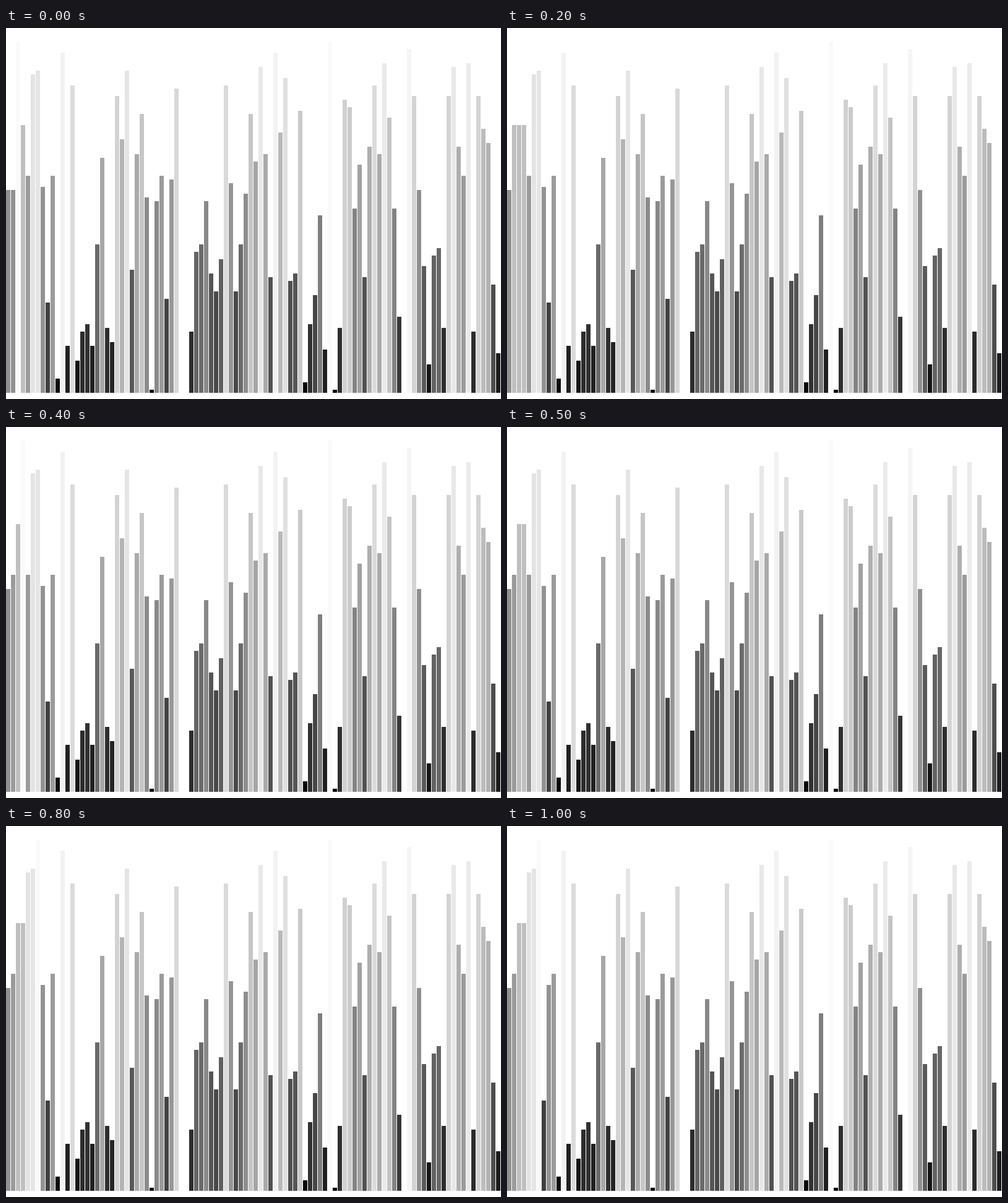
Animation, 800 px wide and 600 px high, one loop 1.1 s. Source, as an HTML page:

```html
<!DOCTYPE html>
<html lang="en">
<head>
<meta charset="utf-8">
<title>Merge sort</title>
<style>
  html, body { margin: 0; width: 100%; height: 100%; overflow: hidden; background: #fff; }
  svg { display: block; width: 100%; height: 100%; }
</style>
</head>
<body>
<svg id="stage" viewBox="0 0 800 600" shape-rendering="crispEdges"></svg>
<script>
const STEP_MS = 100, STEPS = 11;
const PITCH = 8, BAR_WIDTH = 7, FLOOR_Y = 590, MAX_HEIGHT = 580, MAX_VALUE = 99;

const values = [
  74, 56, 97, 74, 60, 88, 89, 57, 25, 60, 4, 94, 13, 85, 9, 17, 19, 13, 41, 65,
  18, 14, 82, 70, 89, 34, 66, 77, 54, 1, 53, 60, 26, 59, 84, 99, 99, 17, 39, 41,
  53, 33, 28, 37, 85, 58, 28, 41, 55, 77, 64, 90, 66, 32, 94, 72, 87, 31, 33, 78,
  3, 19, 27, 49, 12, 97, 1, 18, 81, 79, 51, 63, 32, 68, 85, 66, 91, 76, 51, 21,
  99, 95, 82, 56, 35, 8, 38, 40, 18, 82, 90, 68, 60, 91, 17, 82, 73, 69, 30, 11
];

// Yields a snapshot after every write that changes the array.
function* mergeSort(list, lo, hi) {
  if (lo >= hi) return;
  const mid = (lo + hi) >> 1;
  yield* mergeSort(list, lo, mid);
  yield* mergeSort(list, mid + 1, hi);
  const left = list.slice(lo, mid + 1), right = list.slice(mid + 1, hi + 1);
  for (let i = lo; i <= hi; i++) {
    const takeLeft = !right.length || (left.length && left[0] <= right[0]);
    const next = (takeLeft ? left : right).shift();
    if (next === list[i]) continue;
    list[i] = next;
    yield list.slice();
  }
}

const sorter = mergeSort(values.slice(), 0, values.length - 1);
const states = Array.from({ length: STEPS }, () => sorter.next().value);

const stage = document.getElementById("stage");
const bars = values.map((_, i) => {
  const bar = document.createElementNS("http://www.w3.org/2000/svg", "rect");
  bar.setAttribute("x", i * PITCH);
  bar.setAttribute("width", BAR_WIDTH);
  return stage.appendChild(bar);
});

function draw(state) {
  bars.forEach((bar, i) => {
    const height = Math.floor(state[i] * MAX_HEIGHT / MAX_VALUE);
    const gray = Math.round(state[i] * 255 / MAX_VALUE);
    bar.setAttribute("y", FLOOR_Y - height);
    bar.setAttribute("height", height);
    bar.setAttribute("fill", `rgb(${gray},${gray},${gray})`);
  });
}

const start = performance.now();
function tick() {
  const elapsed = Math.max(0, performance.now() - start);
  draw(states[Math.floor(elapsed / STEP_MS) % STEPS]);
  requestAnimationFrame(tick);
}
tick();
</script>
</body>
</html>
```
